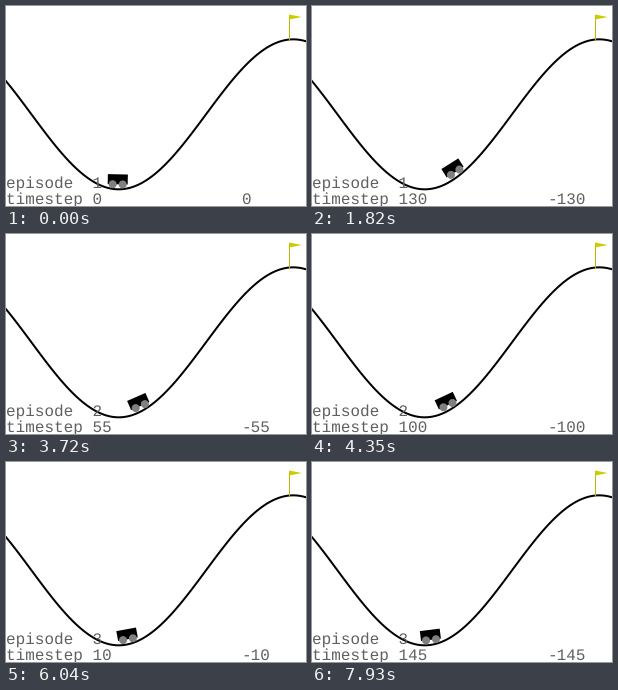
These frames come from a looping animation (300 by 200 pixels, 8000 ms). A matplotlib script:

```python
import math

import matplotlib.pyplot as plt
import numpy as np
from matplotlib.animation import FuncAnimation
from matplotlib.patches import Circle, Polygon
from matplotlib.transforms import Affine2D

WIDTH, HEIGHT, DPI = 300, 200, 100
X_MIN, X_MAX = -1.2, 0.6
SCALE = WIDTH / (X_MAX - X_MIN)
PX = 72 / DPI  # points per pixel

TICK_MS, LOOP_MS = 10, 8000
POSE_MS, STEPS_PER_POSE, POSES = 70, 5, 40
EPISODE_MS = 2950  # the last pose is held a little longer
START_POSITIONS = (-0.5306, -0.418, -0.5085)

plt.rcParams["text.hinting"] = "none"


def hill(x):
    return 0.45 * np.sin(3 * x) + 0.55


def to_px(x):
    return (x - X_MIN) * SCALE, hill(x) * SCALE


def simulate(x):
    """Positions of a car that always pushes right, one per time step."""
    velocity, path = 0.0, [x]
    for _ in range(POSES * STEPS_PER_POSE):
        velocity += 0.001 - 0.0025 * math.cos(3 * x)
        x += velocity
        path.append(x)
    return path


paths = [simulate(x) for x in START_POSITIONS]

fig = plt.figure(figsize=(WIDTH / DPI, HEIGHT / DPI), dpi=DPI, facecolor="white")
ax = fig.add_axes([0, 0, 1, 1])
ax.set(xlim=(0, WIDTH), ylim=(0, HEIGHT))
ax.axis("off")

ax.plot(*to_px(np.linspace(X_MIN, X_MAX, 100)), color="black", lw=2 * PX, zorder=1)

body = Polygon([(-10, 5), (-10, 15), (10, 15), (10, 5)], fc="black", lw=0, zorder=2)
wheels = [Circle((x, 5), 4, fc="#808080", lw=0, zorder=3) for x in (5, -5)]
car = [body, *wheels]
for part in car:
    ax.add_patch(part)

flag_x, flag_base = to_px(0.5)
flag_top = flag_base + 25
ax.plot([flag_x, flag_x], [flag_base, flag_top], color="#b8b800", lw=PX, zorder=4)
ax.add_patch(Polygon([(flag_x, flag_top), (flag_x, flag_top - 5),
                      (flag_x + 12.5, flag_top - 2.5)],
                     fc="#cccc00", lw=0, zorder=5))


def label(x, y):
    return ax.text(x, y, "", family="Liberation Mono", size=16 * PX,
                   color="#606060", va="baseline", zorder=6)


episode_text = label(0, 18)
step_text = label(0, 2)
reward_text = label(235, 2)


def update(frame):
    episode, ms = divmod(frame * TICK_MS, EPISODE_MS)
    step = min(ms // POSE_MS, POSES - 1) * STEPS_PER_POSE
    x = paths[episode][step]
    pose = Affine2D().rotate(math.cos(3 * x)).translate(*to_px(x))
    for part in car:
        part.set_transform(pose + ax.transData)
    episode_text.set_text(f"episode  {episode + 1}")
    step_text.set_text(f"timestep {step}")
    reward_text.set_text(str(-step))
    return [*car, episode_text, step_text, reward_text]


anim = FuncAnimation(fig, update, frames=LOOP_MS // TICK_MS, interval=TICK_MS,
                     init_func=lambda: update(0), repeat=True, repeat_delay=0)
plt.show()
```
